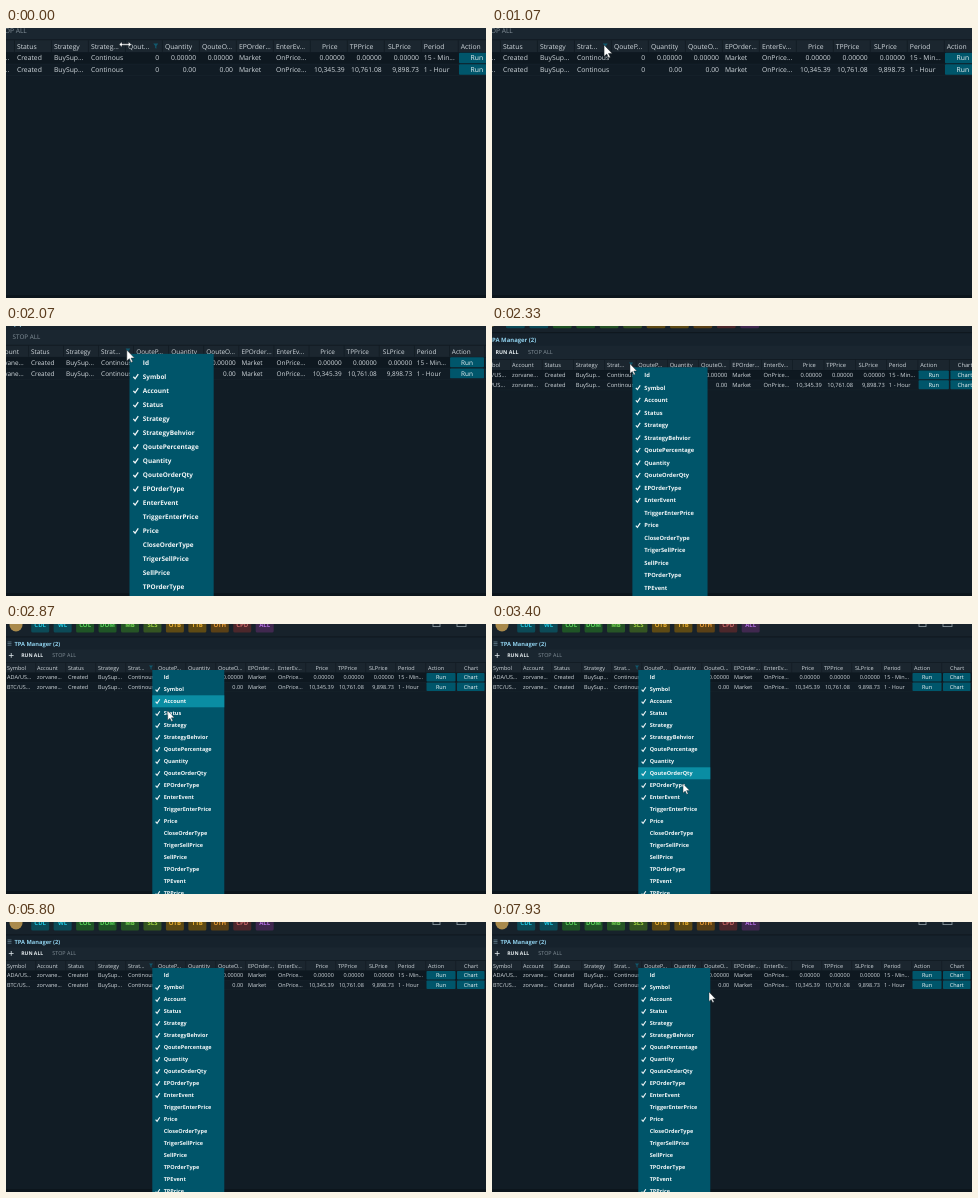
Write an HTML page that moves like this. It is 480 px wide and 270 px high and loops after 8000 ms.

```html
<!DOCTYPE html>
<html lang="en">
<head>
<meta charset="utf-8">
<title>Column chooser</title>
<style>
  html, body { margin: 0; width: 100%; height: 100%; overflow: hidden; background: #111c25; }
  svg { display: block; width: 480px; height: 270px; }
  text { font: 5.5px "Open Sans", "Noto Sans", sans-serif; fill: #d2d9de; text-rendering: geometricPrecision; white-space: pre; }
  .strong { font-weight: 700; font-size: 5.5px; fill: #f2f7f8; }
  .bold { font-weight: 700; font-size: 5.1px; }
  .tag { font-weight: 700; font-size: 6px; }
</style>
</head>
<body>
<svg id="stage" viewBox="0 0 480 270" xmlns="http://www.w3.org/2000/svg">
  <rect width="480" height="270" fill="#111c25"/>
  <rect y="267" width="480" height="3" fill="#0c151c"/>
  <g id="world">
    <g id="chrome"></g>
    <g id="table"></g>
    <g id="menu">
      <rect x="146.3" y="46" width="72" height="236" fill="#00556a"/>
      <rect id="hover" x="146.3" width="72" height="12" fill="#0a8da3"/>
    </g>
    <path id="arrow" d="M0 0V9.4L2.2 7.4L3.7 10.6L5.1 10L3.6 6.9H6.6Z" fill="#fff" stroke="#1a2126" stroke-width=".4"/>
    <path id="resize" d="M-5 0L-2.6 -2.2V-.6H2.6V-2.2L5 0L2.6 2.2V.6H-2.6V2.2Z" fill="#fff" stroke="#10181e" stroke-width=".4"/>
  </g>
</svg>
<script>
const LOOP = 8000;
const ROW = 12, FIRST_ROW = 47.3;
const $ = id => document.getElementById(id);

function add(parent, tag, attrs, content) {
  const el = document.createElementNS("http://www.w3.org/2000/svg", tag);
  for (const key in attrs) el.setAttribute(key, attrs[key]);
  if (content) el.textContent = content;
  parent.appendChild(el);
  return el;
}
const box = (parent, x, y, width, height, fill, more) =>
  add(parent, "rect", { x, y, width, height, fill, ...more });
const label = (parent, x, y, content, more) => add(parent, "text", { x, y, ...more }, content);
const end = { "text-anchor": "end" }, middle = { "text-anchor": "middle" };

function buildChrome() {
  const g = $("chrome");
  box(g, 0, -10, 480, 23, "#17222b");
  add(g, "circle", { cx: 10, cy: 1, r: 6.5, fill: "#a98a4c" });
  const tools = [
    ["CDL", "#20c8de", "#0c4a57"], ["WL", "#20c8de", "#0c4a57"], ["COL", "#5ad65a", "#1f5426"],
    ["DOM", "#5ad65a", "#1f5426"], ["MB", "#74d650", "#265426"], ["SLS", "#9fd03f", "#345422"],
    ["OTB", "#ecb02f", "#5e4a14"], ["TTB", "#ecb02f", "#5e4a14"], ["OTH", "#e89a35", "#5a4016"],
    ["CPD", "#d06a6a", "#4c272b"], ["ALL", "#b06cdc", "#40284f"]
  ];
  tools.forEach(([name, color, back], i) => {
    const x = 34.2 + i * 22.45;
    box(g, x - 9, -9, 18, 17.6, back, { rx: 1.5 });
    label(g, x, 2.8, name, { ...middle, class: "tag", style: `fill:${color}` });
  });
  for (const x of [427, 451])
    box(g, x, -3, x === 427 ? 7 : 9, 5.6, "none", { stroke: "#93a0a8", "stroke-width": .8 });

  box(g, 0, 13, 480, 13, "#16222c");
  box(g, 0, 12.6, 480, .7, "#0b1218");
  for (let i = 0; i < 3; i++) box(g, 1.5, 17.6 + i * 1.6, 4, .7, "#6b8797");
  label(g, 8.5, 22, "TPA Manager (2)", { class: "bold", style: "fill:#8fd0ec;font-size:5.7px" });
  box(g, 0, 25.5, 480, 13.2, "#1a2630");
  box(g, 2.8, 31, 4.8, .8, "#dce4e8");
  box(g, 4.8, 29, .8, 4.8, "#dce4e8");
  label(g, 15.2, 33.1, "RUN ALL", { class: "bold", style: "fill:#e4ebee" });
  label(g, 46.3, 33.1, "STOP ALL", { style: "fill:#84919a;font-size:5.4px" });
}

function buildTable() {
  const g = $("table");
  box(g, 0, 38.5, 480, 10.3, "#1b262f");
  box(g, 0, 38.3, 480, .5, "#0c141a");
  box(g, 0, 48.6, 480, 9.5, "#0e1820");
  box(g, 0, 58, 480, .4, "#18242d");
  box(g, 0, 67.5, 480, .4, "#18242d");
  for (let x = 29.6; x < 480; x += 30) box(g, x, 39, .5, 9.4, "#0f181f");

  const heads = [
    [1, "Symbol"], [31, "Account"], [62, "Status"], [92, "Strategy"], [182, "Quantity"],
    [212, "QouteO..."], [242, "EPOrder..."], [272, "EnterEv..."], [309.4, "Price"],
    [332, "TPPrice"], [363, "SLPrice"], [392, "Period"], [422, "Action"], [458, "Chart"]
  ];
  heads.forEach(([x, name]) => label(g, x, 46, name));

  const left = [1, 31, 62, 92, 122, 242, 272, 392];
  const right = [177.3, 207.3, 237.2, 327.8, 357.8, 388];
  const rows = [
    [["ADA/US...", "zorvane...", "Created", "BuySup...", "Continous", "Market", "OnPrice...", "15 - Min..."],
     ["0", "0.00000", "0.00000", "0.00000", "0.00000", "0.00000"]],
    [["BTC/US...", "zorvane...", "Created", "BuySup...", "Continous", "Market", "OnPrice...", "1 - Hour"],
     ["0", "0.00", "0.00", "10,345.39", "10,761.08", "9,898.73"]]
  ];
  rows.forEach(([words, numbers], i) => {
    const y = 55.2 + i * 9.45;
    words.forEach((word, k) => label(g, left[k], y, word));
    numbers.forEach((number, k) => label(g, right[k], y, number, end));
    [[420.5, 29, "Run"], [451, 27.5, "Chart"]].forEach(([x, width, name]) => {
      box(g, x, y - 6.2, width, 8.5, "#00566b", { rx: .8 });
      label(g, x + width / 2, y, name, { ...middle, style: "fill:#f0f7f8" });
    });
  });
}

function buildMenu() {
  const items = ["Id", "Symbol", "Account", "Status", "Strategy", "StrategyBehvior", "QoutePercentage",
    "Quantity", "QouteOrderQty", "EPOrderType", "EnterEvent", "TriggerEnterPrice", "Price",
    "CloseOrderType", "TrigerSellPrice", "SellPrice", "TPOrderType", "TPEvent", "TPPrice"];
  const checked = i => (i > 0 && i < 11) || i === 12 || i === 18;
  items.forEach((name, i) => {
    const y = FIRST_ROW + (i + .5) * ROW;
    label($("menu"), 157.7, y + 2, name, { class: "strong" });
    if (checked(i)) add($("menu"), "path", {
      d: `M149.6 ${y + .3}l1.5 1.7l2.7 -4`, fill: "none", stroke: "#f2f7f8", "stroke-width": 1.1
    });
  });
}

buildChrome();
buildTable();
buildMenu();
const strategyHead = label($("table"), 122, 46, "Strat...");
const quoteHead = label($("table"), 152, 46, "QouteP...");
const filterIcon = add($("table"), "path", { d: "M0 0H4L2.5 2V4.2L1.5 3.6V2Z", fill: "#12586d" });

const clamp = v => Math.min(1, Math.max(0, v));

// Pointer stops: time, x, y
const descent = [[0, 147.6, 43.6], [70, 147.6, 43.6], [200, 145.2, 43.2], [600, 145.2, 43.2],
  [730, 144, 42.7], [2550, 144, 42.7], [3400, 191, 159.5], [3670, 196, 205], [4130, 200, 278]];
const ascent = [[6420, 222, 275], [7270, 222, 236], [7930, 217, 70]];

function pointerAt(t) {
  const stops = t < 6000 ? descent : ascent;
  const next = stops.findIndex(s => s[0] > t);
  if (next < 0) return stops[stops.length - 1].slice(1);
  if (next === 0) return stops[0].slice(1);
  const a = stops[next - 1], b = stops[next], u = (t - a[0]) / (b[0] - a[0]);
  return [a[1] + (b[1] - a[1]) * u, a[2] + (b[2] - a[2]) * u];
}

function show(el, visible) { el.setAttribute("visibility", visible ? "visible" : "hidden"); }

function draw(t) {
  const away = Math.pow(1 - clamp((t - 1986) / 708), 2.5);
  $("world").setAttribute("transform",
    `translate(${-65.5 * away} ${-35.7 * away}) scale(${1 + .233 * away})`);

  const resizing = t < 70;
  strategyHead.textContent = resizing ? "Strateg..." : "Strat...";
  quoteHead.textContent = resizing ? "Qout..." : "QouteP...";
  filterIcon.setAttribute("transform", `translate(${resizing ? 172.6 : 143} 41.5)`);

  $("menu").setAttribute("opacity", clamp((t - 1470) / 330));

  // The highlighted row trails the pointer slightly.
  const [, hoverY] = pointerAt(t - 70);
  const row = Math.floor((hoverY - FIRST_ROW) / ROW);
  show($("hover"), t > 2550 && t < 4130 && row >= 0);
  $("hover").setAttribute("y", FIRST_ROW + row * ROW);

  const [x, y] = pointerAt(t);
  $("arrow").setAttribute("transform", `translate(${x} ${y})`);
  $("resize").setAttribute("transform", "translate(149.8 42.3)");
  show($("arrow"), !resizing);
  show($("resize"), resizing);
}

const start = performance.now();
function tick() {
  draw((performance.now() - start) % LOOP);
  requestAnimationFrame(tick);
}
draw(0);
requestAnimationFrame(tick);
</script>
</body>
</html>
```
